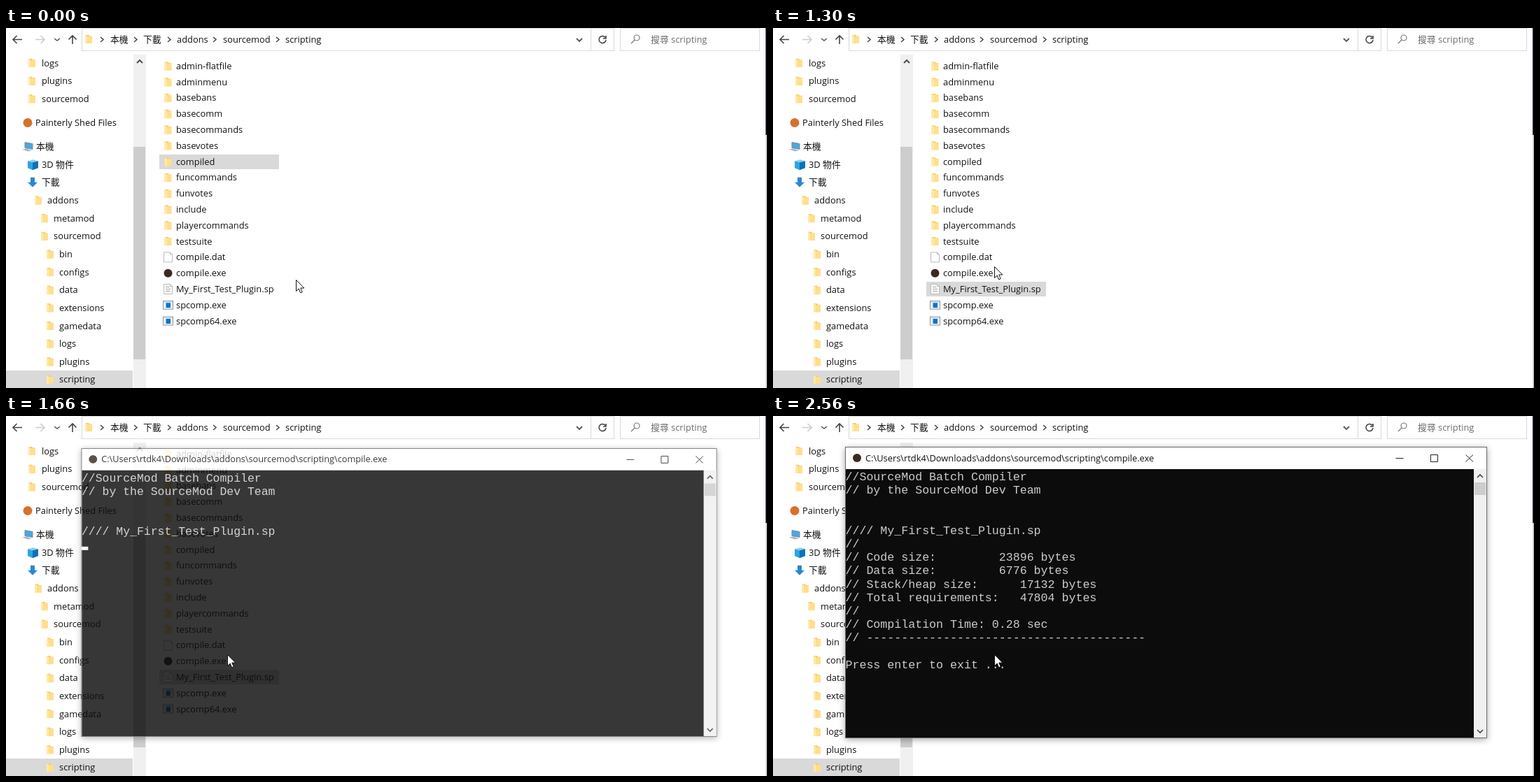
Write an HTML page that moves like this. It is 1087 px wide and 515 px high and loops after 2610 ms.

```html
<!DOCTYPE html>
<html lang="zh-Hant">
<head>
<meta charset="utf-8">
<title>Compile by drag and drop</title>
<style>
html, body { margin: 0; width: 100%; height: 100%; overflow: hidden; background: #fff; }
svg { display: block; width: 100vw; height: 100vh; }
text { font: 12.85px "Open Sans", "Noto Sans CJK TC", "Noto Sans CJK", sans-serif; fill: #111; white-space: pre; }
.console text { font: 16.63px "Liberation Mono", monospace; fill: #ccc; }
#frame { filter: drop-shadow(0 2px 5px rgba(0, 0, 0, .35)); }
</style>
</head>
<body>
<svg id="stage" viewBox="0 0 1087 515"></svg>
<script>
const LOOP = 2610, STEP = 51.5;
const ROW_TOP = 54.4, ROW_PITCH = 22.79;

const rect = (x, y, w, h, fill, extra = '') =>
  `<rect x="${x}" y="${y}" width="${w}" height="${h}" fill="${fill}" ${extra}/>`;
const label = (x, y, text, fill = '#111') =>
  `<text x="${x}" y="${y + 4.5}" style="fill:${fill}">${text}</text>`;
const line = (d, color = '#444', width = 1.4) =>
  `<path d="${d}" fill="none" stroke="${color}" stroke-width="${width}"/>`;
const shape = (d, fill, extra = '') => `<path d="${d}" fill="${fill}" ${extra}/>`;
const dot = (x, y, r, fill) => `<circle cx="${x}" cy="${y}" r="${r}" fill="${fill}"/>`;
const at = (x, y, content) => `<g transform="translate(${x} ${y})">${content}</g>`;
const group = (id, content) => `<g id="${id}">${content}</g>`;
const chevron = (x, y, dx, dy, color = '#444', width = 1.5) => dx
  ? line(`M${x - dx / 2} ${y - 3.5}l${dx} 3.5l${-dx} 3.5`, color, width)
  : line(`M${x - 4} ${y - dy / 2}l4 ${dy}l4 ${-dy}`, color, width);

const icons = {
  folder: shape('M-5 -6h5l1 1.5h3.5v10.500h-9.500z', '#f3c95f') +
          shape('M-5 -6L-1.500 -4.500V7L-5 5.500z', '#ffe9a9') +
          shape('M-1.500 -4H5V6H-1.500z', '#ffdf8c'),
  page: shape('M-6 -7H3L6 -4V7H-6z', '#fff', 'stroke="#b9b9b9"') + line('M3 -7V-4H6', '#b9b9b9', 1),
  app: rect(-7, -6, 14, 12, '#f4f8fb', 'stroke="#8c969d"') + rect(-6.500, -5.500, 13, 2, '#c8d5de') +
       rect(-3, -3, 6.500, 7, '#0873cf'),
  pawn: dot(0, 0, 6, '#3a2a22'),
  cloud: dot(0, 0, 6.5, '#d9702c'),
  pc: shape('M-4 -6L7 -4V4L-4 2z', '#49a7e4', 'stroke="#7c8b96"') + shape('M-8 4L-2 3L6 6L0 7z', '#aab6bf'),
  cube: shape('M-7 -5L1 -7L8 -5L0 -3z', '#7fd3f5') + shape('M-7 -5L0 -3V8L-7 5z', '#2fa5df') +
        shape('M0 -3L8 -5V5L0 8z', '#0c72b8'),
  down: shape('M-3 -7H3V0H7L0 7L-7 0H-3z', '#2d86d2'),
};
icons.script = icons.page + line('M-3.500 -3H2M-3.500 0H3.500M-3.500 3H3.500', '#9b9b9b', 1);

const files = [
  ...['admin-flatfile', 'adminmenu', 'basebans', 'basecomm', 'basecommands', 'basevotes', 'compiled',
    'funcommands', 'funvotes', 'include', 'playercommands', 'testsuite'].map(name => [name, 'folder']),
  ['compile.dat', 'page'], ['compile.exe', 'pawn'], ['My_First_Test_Plugin.sp', 'script'],
  ['spcomp.exe', 'app'], ['spcomp64.exe', 'app'],
];
const rowY = name => ROW_TOP + ROW_PITCH * files.findIndex(file => file[0] === name);
const highlight = (id, name) =>
  rect(219.5, Math.round(rowY(name)) - 9.5, 170, 20, '#d9d9d9', `id="${id}"`);

// Sidebar entries: name, icon, icon centre, text start
const tree = [
  [50, [['logs', 'folder', 37, 51], ['plugins', 'folder', 37, 51], ['sourcemod', 'folder', 37, 51]]],
  [135.5, [['Painterly Shed Files', 'cloud', 31, 42]]],
  [169.5, [['本機', 'pc', 31, 43], ['3D 物件', 'cube', 38, 51], ['下載', 'down', 38, 51],
    ['addons', 'folder', 46, 59], ['metamod', 'folder', 55, 68], ['sourcemod', 'folder', 55, 68],
    ...['bin', 'configs', 'data', 'extensions', 'gamedata', 'logs', 'plugins', 'scripting']
      .map(name => [name, 'folder', 63, 76])]],
];

function explorer() {
  const crumbs = [[149, '本機'], [196, '下載'], [244, 'addons'], [310, 'sourcemod'], [399, 'scripting']];
  return rect(0, 0, 1087, 515, '#fff') +
    rect(1085, 0, 2, 153, '#1b1b26') + rect(1085.5, 153, 1.5, 362, '#b5b5b5') +
    rect(108.5, .5, 760, 32, '#fff', 'stroke="#d9d9d9"') + line('M835.5 0V32', '#d9d9d9', 1) +
    rect(877.5, .5, 199, 32, '#fff', 'stroke="#d9d9d9"') +
    line('M23 16.500H10M15.500 11L10 16.500L15.500 22', '#444', 1.6) +
    line('M42 16.500H55M49.500 11L55 16.500L49.500 22', '#ccc', 1.6) +
    chevron(73, 16.5, 0, 3, '#555') + line('M95 23V11M89.500 16.500L95 11L100.500 16.500', '#444', 1.6) +
    at(118, 16, icons.folder) +
    [137, 185, 233, 298, 388].map(x => chevron(x, 16.5, 4, 0)).join('') +
    crumbs.map(([x, name]) => label(x, 16, name)).join('') +
    chevron(819, 17, 0, 4, '#555', 1.8) +
    line('M856 13.500A5 5 0 1 0 857 17M857 11V15H853', '#444', 1.6) +
    `<circle cx="901" cy="14" r="4" fill="none" stroke="#777" stroke-width="1.200"/>` +
    line('M898 17L893 22', '#777', 1.2) + label(921, 16, '搜尋 scripting', '#6b6b6b') +
    rect(0, 490, 181, 25, '#d9d9d9') +
    rect(182, 38, 18, 477, '#f0f0f0') + rect(182, 170, 17, 304, '#cdcdcd') +
    chevron(191, 48, 0, -4, '#444', 1.8) +
    tree.map(([top, items]) => items.map(([name, icon, x, textX], i) => {
      const y = top + i * 25.65;
      return at(x, y, icons[icon]) + label(textX, y, name);
    }).join('')).join('') +
    highlight('folderRow', 'compiled') + highlight('targetRow', 'compile.exe') +
    highlight('scriptRow', 'My_First_Test_Plugin.sp') +
    files.map(([name, icon], i) => {
      const y = ROW_TOP + i * ROW_PITCH;
      return at(231.5, y, icons[icon]) + label(243, y, name);
    }).join('');
}

const consoleLines = (first, lines) => lines.map((text, i) =>
  `<text x="103.500" y="${92 + (first + i) * 19.2}">${text}</text>`).join('');

function consoleWindow() {
  return rect(103.5, 44.5, 916, 416, '#fff', 'id="frame" stroke="#6a6a6a"') +
    at(120, 60, icons.pawn) +
    label(132, 60, 'C:\\Users\\rtdk4\\Downloads\\addons\\sourcemod\\scripting\\compile.exe') +
    line('M889.500 60.500H900.500M939.500 55.500H949.500V65.500H939.500ZM989.500 55.500L1000 65.500M1000 55.500L989.500 65.500', '#222', 1) +
    rect(104, 76, 897, 384, '#0c0c0c') + rect(1001, 76, 18, 384, '#f0f0f0') +
    rect(1002, 95, 16, 18, '#cdcdcd') +
    chevron(1010, 86, 0, -4, '#444', 1.6) + chevron(1010, 451, 0, 4, '#444', 1.6) +
    '<g class="console">' +
    consoleLines(0, ['//SourceMod Batch Compiler', '// by the SourceMod Dev Team', '', '',
      '//// My_First_Test_Plugin.sp']) +
    group('report', consoleLines(5, ['//', '// Code size:         23896 bytes',
      '// Data size:         6776 bytes', '// Stack/heap size:      17132 bytes',
      '// Total requirements:   47804 bytes', '//', '// Compilation Time: 0.28 sec',
      '// ' + '-'.repeat(40)])) +
    group('prompt', consoleLines(14, ['Press enter to exit ...'])) +
    '</g>' + rect(0, 0, 10, 5, '#fff', 'id="caret"');
}

// Drawn relative to the pointer tip
const ghost = rect(-51.5, -96.5, 111, 111, '#e3f3fb',
    'rx="2" stroke="#cfe3ee" style="filter:drop-shadow(2px 2px 2px rgba(0,0,0,.4))"') +
  shape('M-36 -94H19L42 -71V12H-36z', '#f3f4f5', 'stroke="#c3c7ca"') +
  shape('M19 -94L42 -71H19z', '#dfe1e3', 'stroke="#c3c7ca"') +
  [[43, -65], [24, -52], [43, -38], [32, -25]].map(([w, y]) => rect(-20, y, w, 6, '#c9cbcc')).join('') +
  dot(27, -5, 10, '#2488d1');
const hint = rect(44.5, 16.5, 177, 20, '#fff', 'stroke="#bcbcbc"') +
  line('M50 26.500H60M55 21.500V31.500', '#1979ca', 2) + label(68, 26.5, '使用 compile.exe 開啟', '#1a4f94');
const arrow = shape('M.5 .5V16.500L4.200 13L6.600 18.800L9.200 17.700L6.800 12H11.800Z', '#fff',
  'stroke="#111" stroke-linejoin="round"');

document.getElementById('stage').innerHTML = explorer() + group('console', consoleWindow()) +
  group('pointer', group('ghost', ghost) + group('hint', hint) +
    '<circle id="press" r="12.500" fill="#f7ea28" fill-opacity=".75"/>' + arrow);

const el = id => document.getElementById(id);
const show = (id, visible) => el(id).setAttribute('visibility', visible ? 'inherit' : 'hidden');
const paint = (id, fill, stroke = fill) => {
  el(id).setAttribute('fill', fill);
  el(id).setAttribute('stroke', stroke);
};

// Pointer path: step, x, y
const path = [[0, 414, 360], [3, 386, 366], [7, 347, 372], [11, 347, 372], [13, 348, 368],
  [16, 350, 352], [19, 350, 334], [21, 316, 341], [99, 316, 341]];
function pointerAt(step) {
  const i = path.findIndex(point => point[0] > step);
  const [s0, x0, y0] = path[i - 1], [s1, x1, y1] = path[i];
  const p = (step - s0) / (s1 - s0);
  return [x0 + (x1 - x0) * p, y0 + (y1 - y0) * p];
}

function draw(time) {
  const step = Math.floor(time / STEP);
  const [x, y] = pointerAt(step);
  el('pointer').setAttribute('transform', `translate(${x} ${y})`);

  const pressed = step >= 8 && step < 23;
  const dragging = step >= 13 && step < 25;
  const overTarget = dragging && step < 23 && y > 340 && y < 361;
  show('press', pressed);
  show('ghost', dragging);
  el('ghost').setAttribute('opacity', step < 23 ? .87 : .87 * (25 - step) / 3);
  show('hint', overTarget);

  show('folderRow', step < 8);
  paint('folderRow', '#d9d9d9');
  show('targetRow', overTarget);
  paint('targetRow', '#cce8ff');
  show('scriptRow', step >= 8 || x < 390);
  if (step < 8) paint('scriptRow', '#e5f3ff');
  else if (step < 13) paint('scriptRow', '#cce8ff', '#99d1ff');
  else paint('scriptRow', '#d9d9d9');

  show('console', step >= 28);
  const opacity = Math.min(1, Math.max(.03, .4 + .21 * (step - 30)));
  const scale = step < 35 ? 1 - .031 * .56 ** (step - 30) : 1;
  el('console').setAttribute('opacity', opacity);
  el('console').setAttribute('transform', `translate(562 252.5) scale(${scale}) translate(-562 -252.5)`);
  show('report', step >= 34);
  show('prompt', step >= 35);
  show('caret', time < 2560);
  const [column, row] = step >= 35 ? [23, 14] : step === 34 ? [0, 13] : [0, 5];
  el('caret').setAttribute('x', 103 + column * 10);
  el('caret').setAttribute('y', 90.2 + row * 19.2);
}

function tick() {
  draw(performance.now() % LOOP);
  requestAnimationFrame(tick);
}
tick();
</script>
</body>
</html>
```
